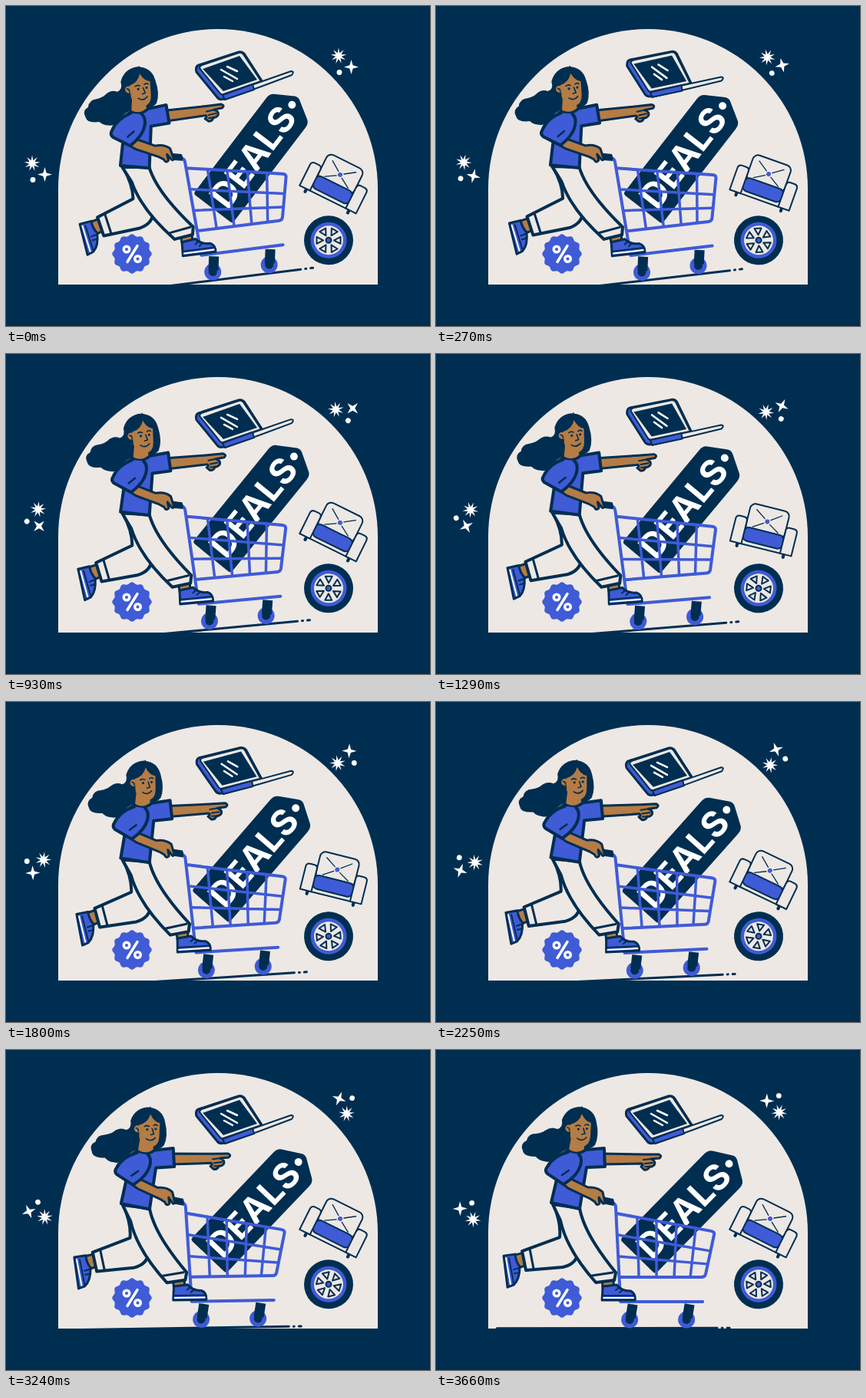
Write an HTML page that moves like this. It is 552 by 417 pixels and loops after 3.69 s.

```html
<!DOCTYPE html>
<html lang="en">
<head>
<meta charset="utf-8">
<title>Deals</title>
<style>
  html, body { margin: 0; width: 100%; height: 100%; overflow: hidden; background: #002e51; }
  svg { display: block; width: 552px; height: 417px; stroke-linejoin: round; stroke-linecap: round; }
  .navy { fill: #002e51; }
  .blue { fill: #3f5bd6; }
  .cream { fill: #ede8e4; }
  .skin { fill: #b57c45; }
  .white { fill: #fff; }
  .line { stroke: #002e51; stroke-width: 4; }
  .thin { stroke: #002e51; stroke-width: 2; }
  .open { fill: none; }
  .wire { fill: none; stroke: #3f5bd6; stroke-width: 4; }
  text { font: 700 46px Inter, "Liberation Sans", sans-serif; text-anchor: middle; }
</style>
</head>
<body>
<svg viewBox="0 0 552 417">
  <defs>
    <g id="sparkles" class="white">
      <polygon data-star="-7 -8 9 10.5 4"/>
      <polygon data-star="9.5 6.5 4 9.5 3"/>
      <circle cx="-6" cy="13.5" r="3.4"/>
    </g>
    <g id="caster">
      <circle class="blue" r="11"/>
      <path class="open" d="M4-20 1-2" stroke="#002e51" stroke-width="13" stroke-linecap="butt"/>
      <circle class="navy" r="5.5"/>
    </g>
  </defs>

  <path class="cream" d="M68 363V238a208 208 0 0 1 416 0V363Z"/>

  <g id="laptop">
    <path class="blue line" style="stroke-width:3" d="M248 86Q246 79 251 77L303 60Q307 59 310 62L334 99 284 121Q278 123 275 119Z"/>
    <path class="cream thin" d="M252 81Q252 78 255 77L303 61Q307 60 309 63L332 98 283 115Q280 116 278 113Z"/>
    <path class="navy" d="M256 82 304 65 327 96 283 111Z"/>
    <path class="open" stroke="#fff" stroke-width="2.5" d="M288 79 301 85M280 83 301 95M284 92 295 98"/>
    <path class="cream thin" d="M282 116 334 98 371 85Q376 85 372 90L332 105 285 122Z"/>
    <path class="blue thin" d="M282 116 321 102 323 109 285 122Z"/>
  </g>

  <g id="sofa">
    <path class="navy line" d="M-31 18V22M31 18V22"/>
    <rect class="cream thin" x="-30" y="-8" width="60" height="26" rx="3"/>
    <rect class="cream thin" x="-26" y="-37" width="52" height="36" rx="7"/>
    <path class="thin open" style="stroke-width:1.3" d="M-17-30-4-21M17-30 4-21M-17-7-4-15M17-7 4-15"/>
    <circle class="blue" cy="-18" r="3"/>
    <rect class="blue thin" x="-27" y="-5" width="54" height="18" rx="7"/>
    <path class="cream thin" d="M-41-12Q-41-17-36-17H-30Q-26-17-26-12V18H-41ZM41-12Q41-17 36-17H30Q26-17 26-12V18H41Z"/>
  </g>

  <g id="tire">
    <circle class="navy" r="32"/>
    <circle class="blue" r="23.5"/>
    <circle class="cream" r="19"/>
    <g id="spokes"></g>
    <circle class="blue thin" r="3.5"/>
  </g>

  <g transform="translate(164 323)">
    <polygon id="badge" class="blue"/>
    <g class="open" stroke="#fff" stroke-width="3.4">
      <path d="M-6 10.5 7-10.5"/>
      <circle cx="-7" cy="-6" r="3.8"/>
      <circle cx="7.5" cy="6.5" r="3.8"/>
    </g>
  </g>

  <g id="shopper">
    <path class="open" stroke="#002e51" stroke-width="3" d="M79 362.5H366M372 362.5H373M379 362.5H382"/>

    <g transform="translate(322 209) rotate(-45.5)">
      <path class="navy" d="M-81-32H72Q79-32 82-27L96-4Q98 0 96 4L82 27Q79 32 72 32H-81Q-85 32-85 28V-28Q-85-32-81-32Z"/>
      <circle class="white" cx="85" r="5"/>
      <text class="white" y="17">DEALS</text>
    </g>

    <use href="#caster" x="252" y="351.5"/>
    <use href="#caster" x="326" y="351.5"/>
    <path class="wire" d="M226 198Q234 199 234 205L240 328H347M235 213 358 236Q363 237 362 241L351 292Q350 296 346 296H239"/>
    <path class="wire" style="stroke-width:3.5" d="M237 241 357 262M238 269 353 279M262 218 264 296M287 223V296M313 228 310 296M338 233 331 296"/>

    <!-- Far arm -->
    <path class="skin line" style="stroke-width:3" d="M216 135 270 136 290 136Q295 138 291 141L280 142Q287 145 284 150 281 153 278 152 276 157 271 156L267 152Q271 150 268 148L217 149Z"/>
    <path class="thin open" d="M280 142 270 143M282 147 272 148M278 152 272 152"/>

    <!-- Back leg -->
    <path class="skin line" style="stroke-width:3" d="M102 267 115 264 118 280 107 284Z"/>
    <path class="blue line" style="stroke-width:3" d="M88 268 103 266Q104 276 109 282 109 299 101 306L93 309Z"/>
    <path class="open" stroke="#fff" stroke-width="2" d="M91 271 97 305"/>
    <path class="thin open" d="M95 271 101 304M101 286 108 284M102 291 108 290"/>
    <path class="cream line" d="M153 202Q163 225 161 244L112 262 117 287 165 283Q187 278 185 256L182 207Z"/>
    <path class="line open" style="stroke-width:3" d="M122 259 127 285"/>

    <!-- Front leg -->
    <path class="skin line" style="stroke-width:3" d="M216 298H231V310H217Z"/>
    <path class="blue line" style="stroke-width:3" d="M217 308 235 306Q241 314 253 314 260 317 259 326H216Z"/>
    <path class="open" stroke="#fff" stroke-width="2" d="M218 323H257"/>
    <path class="thin open" d="M217 320H258M234 313 239 309M239 316 244 312"/>
    <path class="cream line" d="M152 201 187 206Q193 240 234 290L232 300 208 303Q170 260 162 222Z"/>
    <path class="line open" style="stroke-width:3" d="M203 294 230 290"/>

    <!-- Hair and head -->
    <path class="navy" d="M113 131Q109 122 118 118 120 109 130 109 138 108 142 105 150 99 158 103 166 101 164 91 170 75 187 74 206 76 209 94 213 112 207 124 202 130 190 129L170 130Q162 133 158 139 150 148 141 145 134 144 130 139 114 139 113 131Z"/>
    <path class="skin" d="M176 114 193 120V132Q183 139 173 131Z"/>
    <circle class="skin" cx="173" cy="102" r="4.5"/>
    <path class="skin" d="M175 97Q187 94 190 83 194 93 202 95L201 113Q200 125 190 126 178 125 175 113Z"/>
    <path class="thin open" style="stroke-width:1.6" d="M182 99Q185 97 188 99M194 98Q197 96 199 98M192 102 194 109 190 110M184 115Q190 120 196 114M190 74V83M171 101Q174 101 174 105"/>
    <circle class="navy" cx="185.5" cy="103" r="1.6"/>
    <circle class="navy" cx="196.5" cy="102.5" r="1.6"/>

    <!-- Shirt -->
    <path class="blue line" d="M172 131Q183 138 195 130L219 128 220 152 196 153 187 207 150 199 158 165 157 140Z"/>
    <path class="skin" d="M174 130Q184 136 193 129L190 125H175Z"/>

    <!-- Near arm -->
    <path class="navy" d="M217 191 231 194Q233 199 231 203L216 200Z"/>
    <path class="skin line" style="stroke-width:3" d="M168 164 198 179Q210 178 217 185L220 199Q218 202 216 198L212 192 213 200Q209 204 207 198L201 194 172 180 163 173Z"/>
    <path class="blue line" d="M172 133Q153 138 145 152 141 157 145 161L166 175Q184 164 188 151 191 141 186 136"/>
    <path class="line open" style="stroke-width:2.5" d="M164 163 173 157"/>
  </g>

  <g class="sparkles" data-at="41 213" data-turn="180"><use href="#sparkles"/></g>
  <g class="sparkles" data-at="440 73" data-turn="-180"><use href="#sparkles"/></g>
</svg>
<script>
  const LOOP = 3690;
  const $ = id => document.getElementById(id);
  const place = (el, transform) => el.setAttribute('transform', transform);
  const sparkles = document.querySelectorAll('.sparkles');

  // Closed ring of points whose radius depends on the step
  const ring = (count, radius, x = 0, y = 0) =>
    Array.from({ length: count }, (_, i) => {
      const a = i / count * 2 * Math.PI - Math.PI / 2, r = radius(i);
      return `${(x + r * Math.cos(a)).toFixed(2)},${(y + r * Math.sin(a)).toFixed(2)}`;
    }).join(' ');

  for (const el of document.querySelectorAll('[data-star]')) {
    const [x, y, tips, outer, inner] = el.dataset.star.split(' ').map(Number);
    el.setAttribute('points', ring(tips * 2, i => i % 2 ? inner : outer, x, y));
  }
  $('badge').setAttribute('points', ring(120, i => 24.5 + 1.3 * Math.cos(i / 120 * 24 * Math.PI)));
  $('spokes').innerHTML = Array.from({ length: 6 }, (_, i) =>
    `<path class="cream thin" d="M7 0 15.5-4.5V4.5Z" transform="rotate(${i * 60})"/>`).join('');

  // Swing keys: time, sofa tilt, laptop tilt
  const swing = [
    [0, 26.5, 0], [570, 11.5, 15], [900, 26.5, 0], [1290, 14, 7], [1540, 26.5, 0],
    [1800, 14, 4.5], [2170, 26.5, 0], [2700, 14, 4.5], [3180, 26.5, 0], [LOOP, 26.5, 0]
  ];
  const tilt = (t, column) => {
    const next = swing.findIndex(key => key[0] > t);
    const a = swing[next - 1], b = swing[next];
    const u = (t - a[0]) / (b[0] - a[0]);
    return a[column] + (b[column] - a[column]) * u * u * (3 - 2 * u);
  };

  function draw() {
    const t = performance.now() % LOOP, p = t / LOOP;
    place($('shopper'), `rotate(${-7.2 * (1 - p)} 221 212)`);
    place($('laptop'), `rotate(${tilt(t, 2)} 310 90)`);
    place($('sofa'), `translate(427 236) rotate(${tilt(t, 1)})`);
    place($('tire'), `translate(420 305.3) rotate(${360 * p})`);
    for (const el of sparkles)
      place(el, `translate(${el.dataset.at}) rotate(${el.dataset.turn * p})`);
    requestAnimationFrame(draw);
  }
  draw();
</script>
</body>
</html>
```
